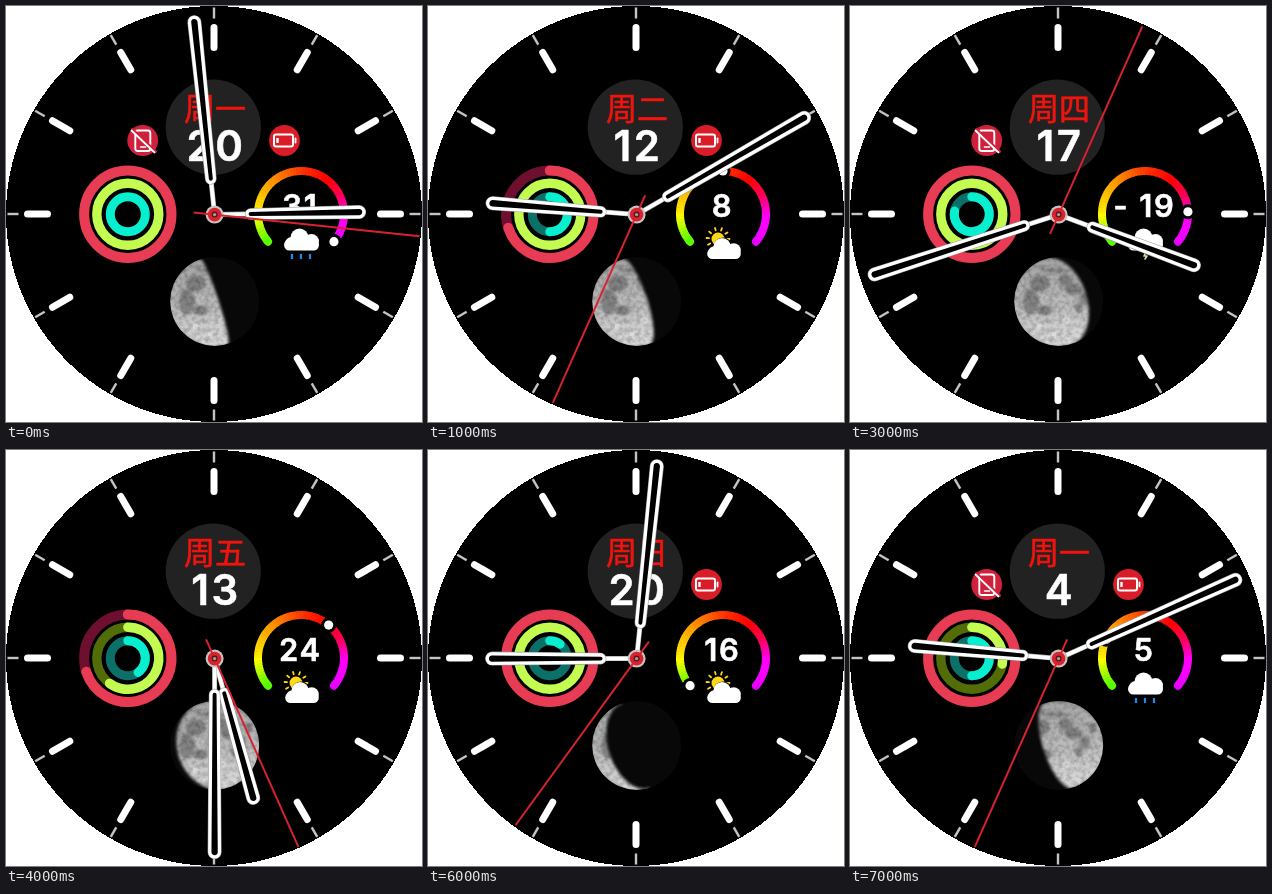
An HTML page that plays this animation: 416 px wide and 416 px high, repeating every 8000 ms.

```html
<!DOCTYPE html>
<html lang="zh">
<head>
<meta charset="utf-8">
<title>Watch face</title>
<style>
html, body { margin: 0; width: 100%; height: 100%; overflow: hidden; background: #fff; }
svg { display: block; width: 416px; height: 416px; }
.num { font-family: Inter, sans-serif; font-weight: 600; letter-spacing: .06em;
  fill: #fff; stroke: #fff; stroke-width: .6; stroke-linejoin: round; text-anchor: middle; }
.day { font: 400 31px "Noto Sans CJK SC", "Noto Sans CJK", sans-serif; fill: #f0140e;
  stroke: #f0140e; stroke-width: .6; stroke-linejoin: round; text-anchor: middle; }
</style>
</head>
<body>
<svg viewBox="0 0 416 416" xmlns="http://www.w3.org/2000/svg">
  <defs>
    <linearGradient id="ball" x1=".4" y1="0" x2=".55" y2="1">
      <stop offset="0" stop-color="#a2a2a2"/><stop offset=".55" stop-color="#bdbdbd"/>
      <stop offset="1" stop-color="#dcdcdc"/>
    </linearGradient>
    <filter id="soft"><feGaussianBlur stdDeviation="1.8"/></filter>
    <filter id="grain" x="0" y="0" width="1" height="1">
      <feTurbulence type="fractalNoise" baseFrequency=".22" numOctaves="2" seed="7"/>
      <feColorMatrix values="0 0 0 0 0  0 0 0 0 0  0 0 0 0 0  1.2 0 0 0 -.45"/>
    </filter>
    <clipPath id="disc"><circle r="44.5"/></clipPath>
  </defs>
  <circle cx="208" cy="208" r="208" shape-rendering="crispEdges"/>
  <g id="ticks"></g>
  <g id="face"></g>
  <g id="hands" transform="translate(208.6 208.6)"></g>
</svg>
<script>
const $ = id => document.getElementById(id);
const WHITE = '#fff', RED = '#d8232f';

// moon: [lit side, terminator bulge]; rings: red, green, cyan progress; dot: gauge angle
const states = [
  { time: [2, 59, 16], day: '一', date: 20, phone: 1, battery: 1, rings: [1, 1, 1], temp: '31', dot: 130, sky: 'rain', moon: [-1, .1] },
  { time: [9, 10, 34], day: '二', date: 12, phone: 0, battery: 1, rings: [.7, 1, .5], temp: '8', dot: 0, sky: 'sun', moon: [-1, .25] },
  { time: [3, 5, 45], day: '三', date: 19, phone: 0, battery: 0, rings: [.42, 1, .2], temp: '0', dot: -66, sky: 'fog', moon: [-1, .42] },
  { time: [3, 42, 4], day: '四', date: 17, phone: 1, battery: 0, rings: [1, 1, .78], temp: '- 19', dot: 87, sky: 'storm', moon: [-1, .64] },
  { time: [5, 30, 26], day: '五', date: 13, phone: 0, battery: 0, rings: [.7, .6, .4], temp: '24', dot: 40, sky: 'sun', moon: [1, .85] },
  { time: [7, 28, 10], day: '六', date: 7, phone: 0, battery: 0, rings: [.41, .22, .08], temp: '32', dot: -130, sky: 'pour', moon: [1, .64] },
  { time: [9, 1, 36], day: '日', date: 20, phone: 0, battery: 1, rings: [1, 1, .1], temp: '16', dot: -130, sky: 'sun', moon: [-1, -.62] },
  { time: [9, 11, 34], day: '一', date: 4, phone: 1, battery: 1, rings: [1, .28, .5], temp: '5', dot: -64, sky: 'rain', moon: [1, .36] }
];

const at = (cx, cy, r, deg) => {
  const a = deg * Math.PI / 180;
  return [(cx + r * Math.sin(a)).toFixed(2), (cy - r * Math.cos(a)).toFixed(2)];
};
const circle = (x, y, r, fill, more = '') => `<circle cx="${x}" cy="${y}" r="${r}" fill="${fill}" ${more}/>`;
const path = (d, color, w, cap = 'round', fill = 'none') =>
  `<path d="${d}" fill="${fill}" stroke="${color}" stroke-width="${w}" stroke-linecap="${cap}" stroke-linejoin="round"/>`;
const arc = (cx, cy, r, from, to, color, w, cap) =>
  path(`M${at(cx, cy, r, from)}A${r} ${r} 0 ${to - from > 180 ? 1 : 0} 1 ${at(cx, cy, r, to)}`, color, w, cap);

function ticks() {
  let s = '';
  for (let i = 0; i < 12; i++)
    s += `<g transform="rotate(${i * 30} 208 208)">` +
      path('M208 21.5V41.5', WHITE, 7) + path('M208 1.5V12.5', '#c4c4c4', 2.4, 'butt') + '</g>';
  return s;
}

function rings(list) {
  const look = [[43.7, 10, '#e83c55', '#6f0f30'], [31, 9.4, '#c3fb50', '#526c08'], [17.5, 9, '#08efd0', '#0b7068']];
  return look.map(([r, w, lit, dim], i) => {
    const p = list[i];
    const ring = circle(121.8, 208.3, r, 'none', `stroke="${p < 1 ? dim : lit}" stroke-width="${w}"`);
    return ring + (p < 1 ? arc(121.8, 208.3, r, 0, p * 360, lit, w) : '');
  }).join('');
}

const hues = [[-130, 100], [-92, 57], [-45, 36], [0, 12], [35, 0], [62, -20], [90, -58], [131, -66]];
function hue(deg) {
  const i = Math.max(1, hues.findIndex(h => h[0] >= deg));
  const [a, x] = hues[i - 1], [b, y] = hues[i];
  return x + (y - x) * (deg - a) / (b - a);
}
function gauge(dot) {
  let s = arc(295, 208, 43, -130, -129, 'hsl(100 100% 50%)', 8) + arc(295, 208, 43, 129, 130, 'hsl(294 100% 50%)', 8);
  for (let d = -130; d < 130; d += 4)
    s += arc(295, 208, 43, d, Math.min(130, d + 4.6), `hsl(${hue(d).toFixed(1)} 100% 50%)`, 8, 'butt');
  const [x, y] = at(295, 208, 43, dot);
  return s + circle(x, y, 7.6, '#000') + circle(x, y, 4.6, WHITE);
}

const cloud = (x, y, k = 1) => `<g transform="translate(${x} ${y}) scale(${k})" fill="#fff">` +
  '<rect x="-17.5" y="-1" width="35" height="11" rx="5.5"/>' +
  '<circle cx="-2" cy="-3" r="9"/><circle cx="10" cy="1" r="7.5"/><circle cx="-10" cy="3" r="6.5"/></g>';
const drops = (xs, w) => xs.map(x => path(`M${x} 248V253`, '#168cf0', w, 'butt')).join('');

const skies = {
  rain: () => cloud(295.5, 234.5) + drops([286, 295, 304], 2.2),
  pour: () => cloud(295.5, 234.5) + drops([285.5, 290.8, 296, 301.3, 306.5], 2.8),
  storm: () => cloud(295.5, 234.5) + path('M296 246L294 250H297L295 253', '#e8d9a0', 1.6),
  sun: () => {
    let s = circle(290, 233, 6.5, '#ffd814');
    for (let a = -120; a <= 90; a += 35)
      s += path(`M${at(290, 233, 9, a)}L${at(290, 233, 11.5, a)}`, '#ffd814', 1.8);
    return s + circle(295, 241, 9.5, '#000') + cloud(296, 243.5, .96);
  },
  fog: () => {
    let s = path('M280.5 242H306.5M280.5 249H306.5', WHITE, 2.6);
    for (let i = 0; i < 8; i++) s += circle(282 + i % 4 * 8, i < 4 ? 228 : 235, 1.4, '#a5a5a5');
    return s;
  }
};

const phone = () => circle(136.7, 134.5, 15.4, '#d0213c') +
  '<rect x="129.3" y="124.5" width="15" height="20.5" rx="2.5" fill="none" stroke="#fff" stroke-width="1.9"/>' +
  path('M134.5 141H139.5', WHITE, 1.6) + path('M126.5 123.5L149.5 145.5', '#d0213c', 3) + path('M125.5 124.5L148.5 146.5', WHITE, 1.8);
const battery = () => circle(278.5, 134.5, 15.4, '#d81c28') +
  '<rect x="268" y="128.5" width="19" height="12" rx="2" fill="none" stroke="#fff" stroke-width="2"/>' +
  path('M289.5 132.5V136.5', WHITE, 1.8) + path('M271.5 132V137', WHITE, 2.4, 'butt');

function moon([side, bulge]) {
  // semicircle on the lit side closed by a half-ellipse terminator
  const outer = side > 0 ? 1 : 0, inner = bulge > 0 ? outer : 1 - outer;
  const lit = `M0-45A45 45 0 0 ${outer} 0 45A${Math.abs(bulge) * 45} 45 0 0 ${inner} 0-45Z`;
  const seas = [[-19, -18, 10, 8], [-28, 0, 8, 13], [-14, 9, 8, 5], [7, -21, 7, 6], [15, -12, 9, 6],
    [26, -3, 5, 7], [34, -17, 4, 5], [-5, -31, 14, 2], [20, 6, 4, 5]];
  const spots = [[-5, 32, 2.5], [-12, -3, 2], [7, 20, 4], [17, 27, 3], [-19, 25, 3]];
  return '<g transform="translate(208.7 295.4)"><mask id="lit" maskUnits="userSpaceOnUse" x="-50" y="-50" width="100" height="100">' +
    `<path d="${lit}" transform="rotate(-18) translate(${side} 0)" fill="#fff" stroke="#fff" filter="url(#soft)"/></mask>` +
    circle(0, 0, 44.5, '#080808') +
    '<g clip-path="url(#disc)"><g mask="url(#lit)">' + circle(0, 0, 45, 'url(#ball)') +
    '<g filter="url(#soft)">' + seas.map(([x, y, a, b]) => `<ellipse cx="${x}" cy="${y}" rx="${a}" ry="${b}" fill="#666" opacity=".65"/>`).join('') + '</g>' +
    spots.map(([x, y, r]) => circle(x, y, r, '#eee', 'opacity=".4"')).join('') +
    '<rect x="-45" y="-45" width="90" height="90" filter="url(#grain)" opacity=".4"/></g></g></g>';
}

function hand(deg, tip) {
  const a = 4.8, b = 3.6, low = 36;
  const d = `M${-a} ${-tip}A${a} ${a} 0 0 1 ${a} ${-tip}L${b} ${-low}A${b} ${b} 0 0 1 ${-b} ${-low}Z`;
  return `<g transform="rotate(${deg})">` + path('M0 0V-32', '#aaa', 5, 'butt') + path('M0 0V-32', WHITE, 3.8, 'butt') +
    path(d, '#999', 4.4, 'round', '#000') + path(d, WHITE, 3.3, 'round', '#000') + '</g>';
}

const hands = ([h, m, s]) =>
  hand(h * 30 + (m - 1) / 2, 144.5) + hand(m * 6, 193.5) +
  circle(0, 0, 9, '#c9c2c2') +
  `<g transform="rotate(${s * 6})">` + path('M0 21V-206', RED, 2, 'butt') + '</g>' +
  circle(0, 0, 6.8, RED) + circle(0, 0, 3, '#571519') + circle(0, 0, 1.7, '#a89a9a');

function draw(st) {
  $('face').innerHTML = circle(207.3, 121.2, 47.6, '#222') +
    `<text class="day" x="209" y="113.5">周${st.day}</text>` +
    `<text class="num" x="210" y="155" font-size="42">${st.date}</text>` +
    (st.phone ? phone() : '') + (st.battery ? battery() : '') +
    rings(st.rings) + gauge(st.dot) +
    `<text class="num" x="294.5" y="211.3" font-size="31">${st.temp}</text>` +
    skies[st.sky]() + moon(st.moon);
  $('hands').innerHTML = hands(st.time);
}

$('ticks').innerHTML = ticks();
let shown = -1;
const start = performance.now();
function frame() {
  const i = Math.floor((performance.now() - start) % 8000 / 1000);
  if (i !== shown) draw(states[shown = i]);
  requestAnimationFrame(frame);
}
frame();
</script>
</body>
</html>
```
